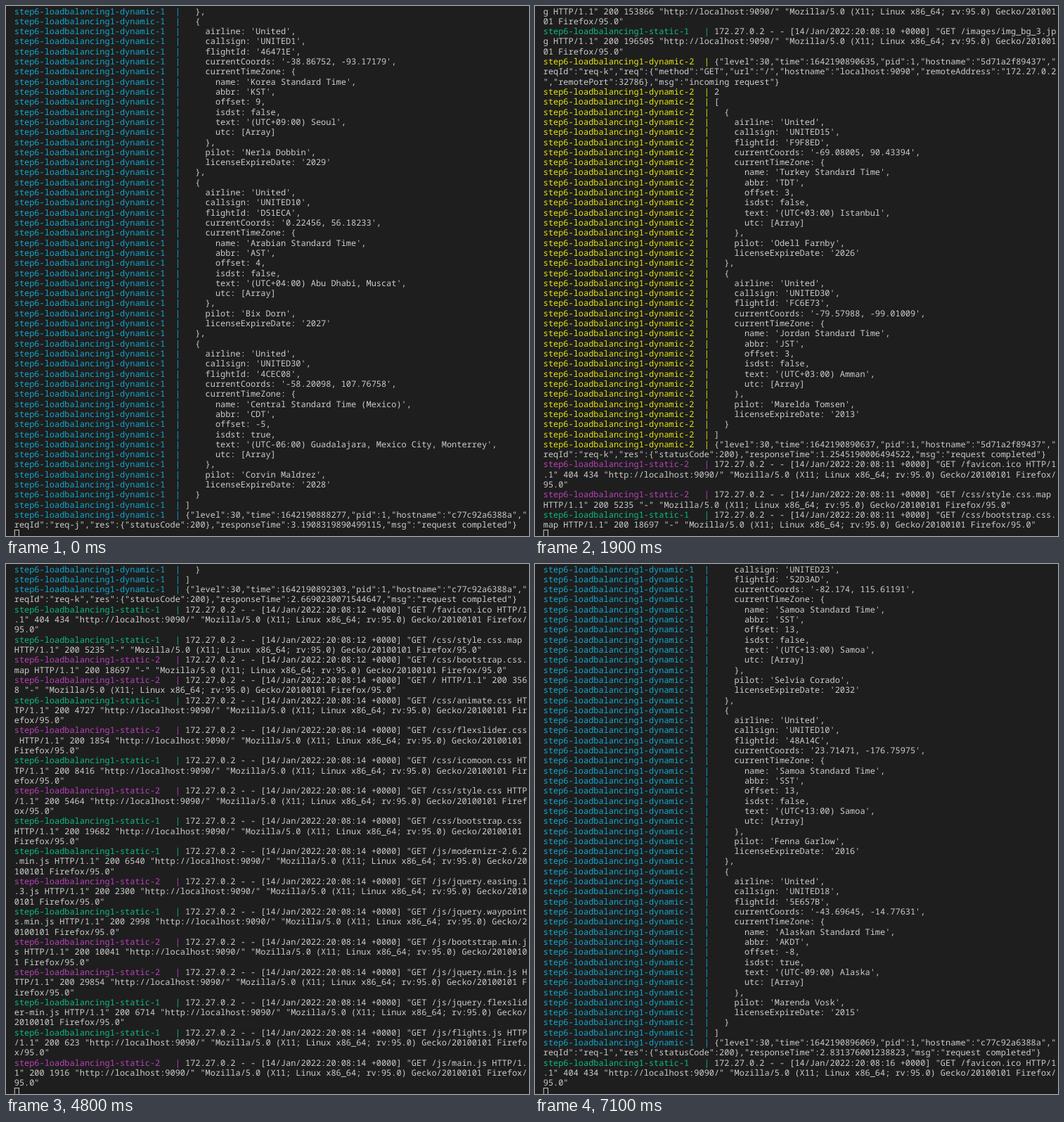
An HTML page that plays this animation: 744x753 px, repeating every 7300 ms.

```html
<!DOCTYPE html>
<html lang="en">
<head>
<meta charset="utf-8">
<title>Load balancing log</title>
<style>
  html, body { margin: 0; width: 100%; height: 100%; overflow: hidden; background: #1e1e1e; }
  svg { display: block; width: 744px; height: 753px; }
  text {
    font: 11.93px "Noto Sans Mono", "DejaVu Sans Mono", monospace;
    white-space: pre;
    text-rendering: geometricPrecision;
    fill: #cccccc;
  }
</style>
</head>
<body>
<svg id="stage" viewBox="0 0 744 753"></svg>
<script>
const COLS = 102, ROWS = 52, LOOP = 7300;
const LEFT = 11.75, PITCH = 14.31, BASELINE = 11.5, CELL = 7.158;
const COLORS = {
  'dynamic-1': '#11a8cd', 'dynamic-2': '#e5e510',
  'static-1': '#0dbc79', 'static-2': '#bc3fbc'
};

const log = [];    // wrapped terminal rows
const steps = [];  // moments at which new rows appear

function write(service, message) {
  const prefix = `step6-loadbalancing1-${service}`.padEnd(32) + '|';
  const first = COLS - prefix.length - 1;
  log.push({ color: COLORS[service], prefix, body: ' ' + message.slice(0, first) });
  for (let i = first; i < message.length; i += COLS)
    log.push({ color: '', prefix: '', body: message.slice(i, i + COLS) });
}

const show = time => steps.push({ time, end: log.length });

// Static servers

const ASSETS = [
  ['', 3568], ['css/animate.css', 4727], ['css/flexslider.css', 1854],
  ['css/icomoon.css', 8416], ['css/style.css', 5464], ['js/modernizr-2.6.2.min.js', 6540],
  ['css/bootstrap.css', 19682], ['js/jquery.easing.1.3.js', 2300],
  ['js/jquery.waypoints.min.js', 2998], ['js/bootstrap.min.js', 10041],
  ['js/jquery.min.js', 29854], ['js/jquery.flexslider-min.js', 6714],
  ['js/flights.js', 623], ['js/main.js', 1916]
];
const IMAGES = [
  ['images/loader.gif', 10132], ['images/img_bg_1.jpg', 174320],
  ['images/img_bg_2.jpg', 153866], ['images/img_bg_3.jpg', 196505]
];

function get(server, second, [path, size], status = 200) {
  const referer = !path || path.endsWith('.map') ? '-' : 'http://localhost:9090/';
  write('static-' + server,
    `172.27.0.2 - - [14/Jan/2022:20:08:${second} +0000] "GET /${path} HTTP/1.1" ${status} ${size} ` +
    `"${referer}" "Mozilla/5.0 (X11; Linux x86_64; rv:95.0) Gecko/20100101 Firefox/95.0"`);
}

// order holds base-14 asset indexes, servers the replica answering each one
function load(second, order, servers) {
  [...order].forEach((digit, i) => get(servers[i], second, ASSETS[parseInt(digit, 14)]));
}

const loadImages = (second, servers, from = 0) =>
  [...servers].forEach((server, i) => get(server, second, IMAGES[from + i]));

const favicon = (server, second) => get(server, second, ['favicon.ico', 434], 404);

function maps(servers, second) {
  get(servers[0], second, ['css/style.css.map', 5235]);
  get(servers[1], second, ['css/bootstrap.css.map', 18697]);
}

// Dynamic servers

function json(server, time, req, rest) {
  const host = server === 1 ? 'c77c92a6388a' : '5d71a2f89437';
  write('dynamic-' + server,
    `{"level":30,"time":1642190${time},"pid":1,"hostname":"${host}","reqId":"${req}",${rest}}`);
}

const incoming = (server, time, req, port) => json(server, time, req,
  '"req":{"method":"GET","url":"/","hostname":"localhost:9090",' +
  `"remoteAddress":"172.27.0.2","remotePort":${port}},"msg":"incoming request"`);

const completed = (server, time, req, ms) => json(server, time, req,
  `"res":{"statusCode":200},"responseTime":${ms},"msg":"request completed"`);

function flight(server, record, last) {
  const [number, id, coords, zone, abbr, offset, places, pilot, year, dst] = record.split('|');
  const utc = offset - (dst ? 1 : 0);
  const hours = (utc < 0 ? '-' : '+') + String(Math.abs(utc)).padStart(2, '0');
  [
    '  {',
    "    airline: 'United',",
    `    callsign: 'UNITED${number}',`,
    `    flightId: '${id}',`,
    `    currentCoords: '${coords}',`,
    '    currentTimeZone: {',
    `      name: '${zone}',`,
    `      abbr: '${abbr}',`,
    `      offset: ${offset},`,
    `      isdst: ${!!dst},`,
    `      text: '(UTC${hours}:00) ${places}',`,
    '      utc: [Array]',
    '    },',
    `    pilot: '${pilot}',`,
    `    licenseExpireDate: '${year}'`,
    last ? '  }' : '  },'
  ].forEach(line => write('dynamic-' + server, line));
}

const flights = (server, records, closing = true) => {
  records.forEach((r, i) => flight(server, r, closing && i === records.length - 1));
  if (closing) write('dynamic-' + server, ']');
};

function open(server, count) {
  write('dynamic-' + server, String(count));
  write('dynamic-' + server, '[');
}

// Session

write('dynamic-1', '  },');
flights(1, [
  '1|46471E|-38.86752, -93.17179|Korea Standard Time|KST|9|Seoul|Nerla Dobbin|2029',
  '10|D51ECA|0.22456, 56.18233|Arabian Standard Time|AST|4|Abu Dhabi, Muscat|Bix Dorn|2027',
  '30|4CEC08|-58.20098, 107.76758|Central Standard Time (Mexico)|CDT|-5|Guadalajara, Mexico City, Monterrey|Corvin Maldrez|2028|dst'
]);
completed(1, 888277, 'req-j', '3.1908319890499115');
show(0);

load(10, '0', '2');
show(700);
load(10, '123456', '122121');
show(800);
load(10, '789abcd', '2211112');
show(900);
loadImages(10, '12');
show(1100);
loadImages(10, '21', 2);
show(1200);

incoming(2, 890635, 'req-k', 32786);
open(2, 2);
flights(2, [
  '15|F9F8ED|-69.08005, 90.43394|Turkey Standard Time|TDT|3|Istanbul|Odell Farnby|2026',
  '30|FC6E73|-79.57988, -99.01009|Jordan Standard Time|JST|3|Amman|Marelda Tomsen|2013'
]);
completed(2, 890637, 'req-k', '1.2545190006494522');
show(1600);
favicon(2, 11);
maps('21', 11);
show(1900);

load(11, '023165', '111221');
show(2300);
load(11, '47b89acd', '21212221');
show(2400);

open(1, 3);
flights(1, [
  '12|A81F30|41.20715, 12.48106|SA Western Standard Time|SWST|-4|Georgetown, La Paz, Manaus, San Juan|Tilla Garvo|2030',
  '26|847443|-17.06372, -130.47248|E. South America Standard Time|ESAST|-3|Brasilia|Brandel Holmby|2007',
  '43|366E26|3.68581, -176.93137|Eastern Standard Time|EDT|-4|Eastern Time (US & Canada)|Dorrie Pelaza|2006|dst'
]);
completed(1, 892303, 'req-k', '2.6690230071544647');
favicon(1, 12);
maps('12', 12);
show(4300);

load(14, '012346', '212121');
show(4700);
load(14, '5789abcd', '12122112');
show(4800);

loadImages(14, '1221');
incoming(2, 894684, 'req-l', 32810);
open(2, 3);
flights(2, [
  '37|B04D52|52.61840, -31.70926|Turkey Standard Time|TDT|3|Istanbul|Wend Parlow|2006',
  '14|9E3CA4|27.75608, -9.17627|FLE Standard Time|FDT|3|Helsinki, Kyiv, Riga, Sofia, Tallinn, Vilnius|Isva Denwick|2017|dst',
  '9|2A7943|9.38655, 11.78689|Egypt Standard Time|EST|2|Cairo|Lorinda Helmsen|2019'
]);
completed(2, 894686, 'req-l', '2.1517059952020645');
show(5300);
favicon(2, 14);
show(5600);
maps('21', 15);
show(5700);

load(15, '0123465789abcd', '12122112122121');
show(6300);

loadImages(15, '2112');
incoming(1, 896066, 'req-l', 32828);
open(1, 6);
flights(1, [
  '5|C1792B|14.90233, 73.55018|Korea Standard Time|KST|9|Seoul|Arlen Toskey|2021',
  '21|70E4AF|-26.31874, 8.64402|Jordan Standard Time|JST|3|Amman|Mirva Caldon|2018',
  '34|D8305C|61.07752, -45.29361|Egypt Standard Time|EST|2|Cairo|Jorrin Welby|2024'
], false);
flight(1, '23|52D3AD|-82.174, 115.61191|Samoa Standard Time|SST|13|Samoa|Selvia Corado|2032');
show(6700);
flight(1, '10|48A14C|23.71471, -176.75975|Samoa Standard Time|SST|13|Samoa|Fenna Garlow|2016');
show(6900);
flights(1, ['18|5E657B|-43.69645, -14.77631|Alaskan Standard Time|AKDT|-8|Alaska|Marenda Vosk|2015|dst']);
completed(1, 896069, 'req-l', '2.831376001238823');
show(7000);
favicon(1, 16);
show(7100);

// Display

const stage = document.getElementById('stage');

function make(tag, attributes, parent) {
  const node = document.createElementNS('http://www.w3.org/2000/svg', tag);
  for (const name in attributes) node.setAttribute(name, attributes[name]);
  return parent.appendChild(node);
}

const rows = Array.from({ length: ROWS }, (_, i) => {
  const text = make('text', { x: LEFT, y: i * PITCH + BASELINE }, stage);
  return { prefix: make('tspan', {}, text), body: make('tspan', {}, text) };
});
make('rect', {
  x: LEFT + 0.5, y: ROWS * PITCH + 0.5, width: CELL - 1, height: PITCH - 1,
  fill: 'none', stroke: '#cccccc'
}, stage);

let shown;
function render(time) {
  const step = steps.findLast(s => s.time <= time);
  if (step === shown) return;
  shown = step;
  rows.forEach(({ prefix, body }, i) => {
    const line = log[step.end - ROWS + i];
    prefix.textContent = line.prefix;
    prefix.style.fill = line.color;
    body.textContent = line.body;
  });
}

const start = performance.now();
function tick() {
  render((performance.now() - start) % LOOP);
  requestAnimationFrame(tick);
}
tick();
</script>
</body>
</html>
```
